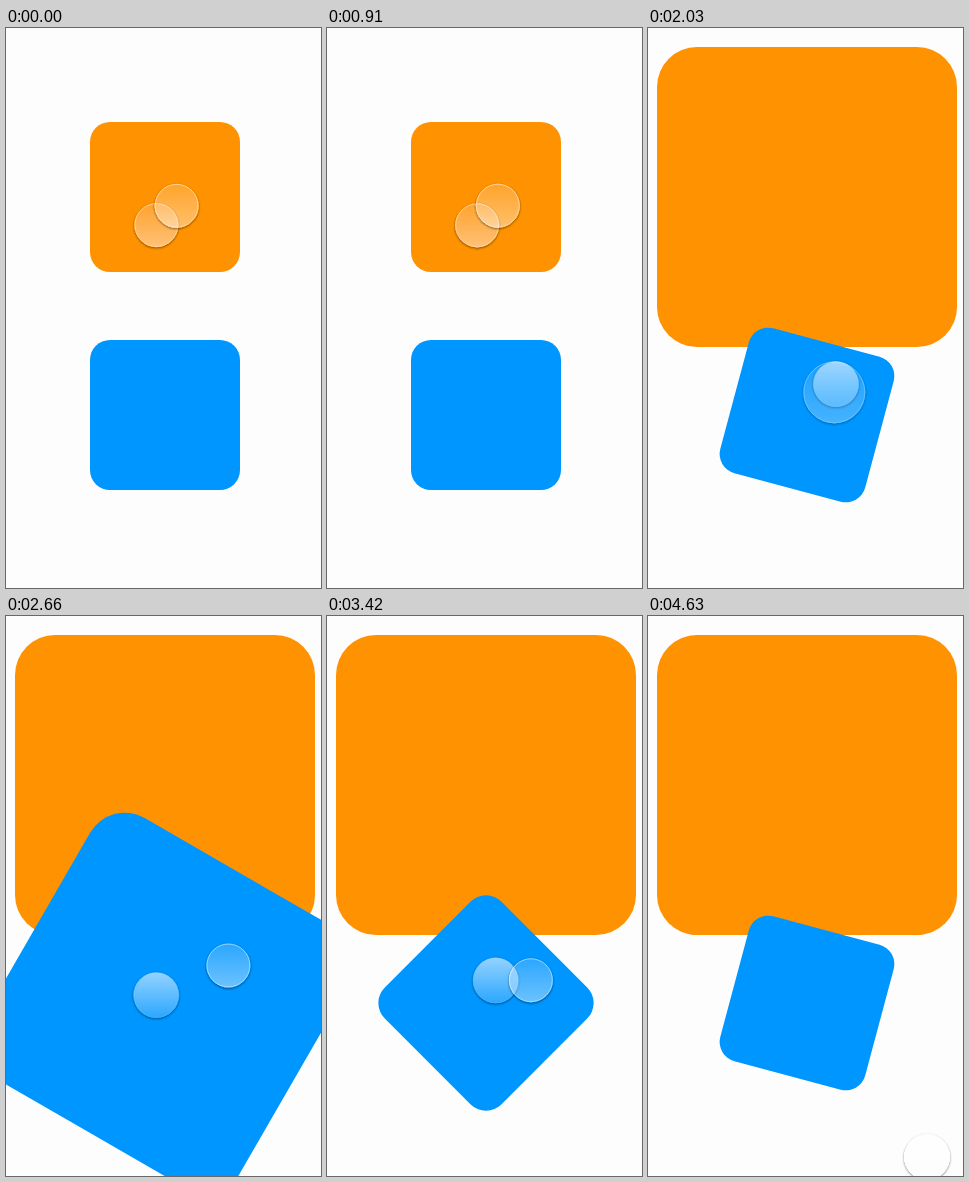
An HTML page that plays this animation: 315 by 560 pixels, repeating every 4.73 s.

```html
<!DOCTYPE html>
<html lang="en">
<head>
<meta charset="utf-8">
<title>Pinch and rotate</title>
<style>
  html, body { margin: 0; width: 100%; height: 100%; overflow: hidden; background: #fdfdfd; }
  svg { display: block; width: 100vw; height: 100vh; }
</style>
</head>
<body>
<svg viewBox="0 0 315 560">
  <defs>
    <linearGradient id="pressed" x2="0" y2="1">
      <stop stop-color="#ffeae4" stop-opacity=".2"/>
      <stop offset="1" stop-color="#fff0ee" stop-opacity=".5"/>
    </linearGradient>
    <linearGradient id="second" x2="0" y2="1">
      <stop stop-color="#fff" stop-opacity=".17"/>
      <stop offset="1" stop-color="#fff" stop-opacity=".42"/>
    </linearGradient>
    <linearGradient id="cursor" x2="0" y2="1">
      <stop stop-color="#fff" stop-opacity=".58"/>
      <stop offset="1" stop-color="#fff" stop-opacity=".17"/>
    </linearGradient>
    <!-- Shadow only outside the translucent disc -->
    <filter id="shadow" x="-30%" y="-30%" width="160%" height="160%" color-interpolation-filters="sRGB">
      <feComponentTransfer in="SourceAlpha" result="solid"><feFuncA type="linear" slope="12"/></feComponentTransfer>
      <feGaussianBlur stdDeviation="1.3"/>
      <feOffset dy="1.2"/>
      <feComposite in2="solid" operator="out"/>
      <feComponentTransfer result="shade"><feFuncA type="linear" slope=".42"/></feComponentTransfer>
      <feMerge><feMergeNode in="shade"/><feMergeNode in="SourceGraphic"/></feMerge>
    </filter>
  </defs>
  <rect width="315" height="560" fill="#fdfdfd"/>
  <rect id="orange" x="-75" y="-75" width="150" height="150" rx="20" fill="#ff9200"/>
  <rect id="blue" x="-75" y="-75" width="150" height="150" rx="20" fill="#0096ff"/>
  <g stroke="#fff" stroke-opacity=".55">
    <circle id="fingerA" filter="url(#shadow)"/>
    <circle id="fingerB" fill="url(#second)" filter="url(#shadow)"/>
  </g>
</svg>
<script>
const LOOP = 4730;
const RELEASE = 1500, TOUCH = 2030, LIFT = 4240;
const touchPoint = { x: 188, y: 356 };
const exitPoint = { x: 279, y: 541 };
const orangeCenter = { x: 160.5, y: 187.5 };
const blueCenter = { x: 186.3, y: 364.3 };

const [orange, blue, fingerA, fingerB] =
  ["orange", "blue", "fingerA", "fingerB"].map(id => document.getElementById(id));

const clamp = (v, lo = 0, hi = 1) => Math.min(hi, Math.max(lo, v));
const mix = (a, b, p) => a + (b - a) * p;
const mixPoint = (a, b, p) => ({ x: mix(a.x, b.x, p), y: mix(a.y, b.y, p) });
const progress = (t, from, to) => clamp((t - from) / (to - from));
const ease = p => p * p * (3 - 2 * p);
const wave = cycles => (1 - Math.cos(2 * Math.PI * cycles)) / 2;

// Each pinch is half the finger distance and the angle of the line between them
function orangePinch(t) {
  const spread = wave(1.5 * progress(t, 170, 1250));
  return { half: mix(14, 42, spread), angle: mix(-43.5, -36.5, spread) };
}

function bluePinch(t) {
  const spread = wave(progress(t, TOUCH, 3280) + progress(t, 3280, 4030));
  const turn = progress(t, 2250, 3150) - progress(t, 3420, 3700);
  return { half: mix(8, 39, spread), angle: mix(-41, 0, turn) };
}

const zoom = ({ half }) => clamp(2 * half / 32, 1, 2);
const snap = ({ angle }) => Math.round((angle + 52) / 15) * 15;

function fingerAt(center, { half, angle }, side) {
  const a = angle * Math.PI / 180;
  return { x: center.x + side * half * Math.cos(a), y: center.y + side * half * Math.sin(a) };
}

function place(el, y, scale, angle = 0) {
  el.setAttribute("transform", `translate(159 ${y}) rotate(${angle}) scale(${scale})`);
}

function setCircle(el, { x, y }, r) {
  el.setAttribute("cx", x);
  el.setAttribute("cy", y);
  el.setAttribute("r", r - 0.5);
}

function render(t) {
  const onOrange = t < RELEASE;
  const onBlue = t >= TOUCH && t < LIFT;
  const first = orangePinch(t), second = bluePinch(t);
  const center = onOrange ? orangeCenter : blueCenter;
  const pinch = onOrange ? first : second;
  const land = onOrange ? 1 : ease(progress(t, TOUCH, TOUCH + 150));

  place(orange, 169, zoom(first));
  place(blue, 387, zoom(second), t < TOUCH ? 0 : snap(second));

  let a = fingerAt(center, pinch, -1);
  if (!onOrange) {
    const glide = ease(progress(t, RELEASE, TOUCH));
    const approach = mixPoint(fingerAt(orangeCenter, first, -1), touchPoint, glide);
    a = mixPoint(mixPoint(approach, a, land), exitPoint, ease(progress(t, LIFT, 4630)));
  }
  setCircle(fingerA, a, onOrange ? 22 : 23);
  fingerA.setAttribute("fill", `url(#${onOrange ? "pressed" : "cursor"})`);
  fingerA.setAttribute("stroke-opacity", onOrange ? 0.5 : 0.15);

  setCircle(fingerB, mixPoint(center, fingerAt(center, pinch, 1), land), mix(31, 22, land));
  fingerB.setAttribute("opacity", onOrange || onBlue ? mix(0.65, 1, land) : 0);
}

const start = performance.now();
function tick() {
  render((performance.now() - start) % LOOP);
  requestAnimationFrame(tick);
}
tick();
</script>
</body>
</html>
```
